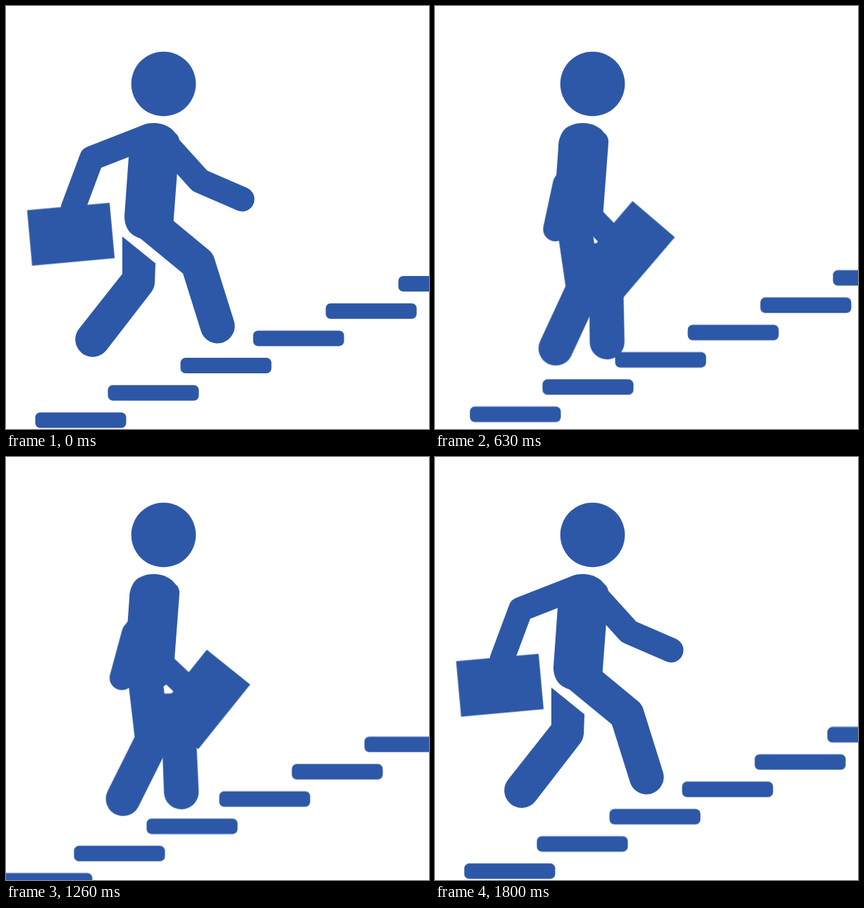
An HTML page for the animation above (1.83 s loop, 600 by 600 pixels).

```html
<!DOCTYPE html>
<html lang="en">
<head>
<meta charset="utf-8">
<title>Climbing the stairs</title>
<style>
  html, body { margin: 0; width: 100%; height: 100%; overflow: hidden; background: #fff; }
  svg { display: block; width: 100vw; height: 100vh; fill: #2d58a7; }

  .limb { fill: none; stroke: #2d58a7; stroke-linecap: round; stroke-linejoin: round; }
  .arm { stroke-width: 34.8; }
  .leg { stroke-width: 49; }

  .swing { --from: 0deg; animation: swing 1830ms infinite; }
  .stairs { animation: climb 1830ms infinite cubic-bezier(.333, 0, .667, 1); }

  .bag-arm   { --to: -88.7deg; transform-origin: 197px 187px; }
  .bag       { --from: -5.2deg; --to: 22.7deg; transform-origin: 89.2px 303px; }
  .free-arm  { --to: 108deg; transform-origin: 227px 195px; }
  .near-leg  { --to: 58deg; transform-origin: 194.8px 303.2px; }
  .far-leg   { --to: -53.4deg; transform-origin: 188.6px 303.2px; }

  /* 900 ms there, 900 ms back, then a 30 ms rest */
  @keyframes swing {
    0% { transform: rotate(var(--from)); animation-timing-function: cubic-bezier(.42, 0, .72, 1); }
    49.18% { transform: rotate(var(--to)); animation-timing-function: cubic-bezier(.45, 0, .8, 1); }
    98.36%, 100% { transform: rotate(var(--from)); }
  }
  /* two stair pitches per loop, the first stride longer */
  @keyframes climb {
    0% { transform: translate(0, 0); }
    49.18% { transform: translate(-121px, 38.7px); }
    98.36%, 100% { transform: translate(-206px, 77.4px); }
  }
</style>
</head>
<body>
<svg viewBox="0 0 600 600">
  <defs><rect id="step" width="129" height="22" rx="7"/></defs>

  <g class="stairs">
    <use href="#step" x="41.5" y="576.5"/>
    <use href="#step" x="144.5" y="537.8"/>
    <use href="#step" x="247.5" y="499.1"/>
    <use href="#step" x="350.5" y="460.4"/>
    <use href="#step" x="453.5" y="421.7"/>
    <use href="#step" x="556.5" y="383"/>
    <use href="#step" x="659.5" y="344.3"/>
    <use href="#step" x="762.5" y="305.6"/>
  </g>

  <path class="swing far-leg" d="M165 327L212 365L211 393Q210 401 206 406L142.4 488.3A24.7 24.7 0 0 1 103.6 457.7L165 380Z"/>
  <path class="swing near-leg limb leg" d="M195 301.5L272.2 365.2L300 454"/>

  <circle cx="223.5" cy="110.5" r="45.8"/>
  <path d="M175 200C175 178 190 166 209 166C225 166 235 173 240 180Q246.5 185 246 194L238 300C238 318 222 331 203 331C180 331 168 318 168 298Z"/>

  <g class="swing bag-arm">
    <path class="limb arm" d="M197 186.5L121.5 216L95 287"/>
    <rect class="swing bag" x="31.35" y="284.4" width="117.5" height="79"/>
  </g>
  <path class="swing free-arm limb arm" d="M227 195L275 248L335 274"/>
</svg>
</body>
</html>
```
